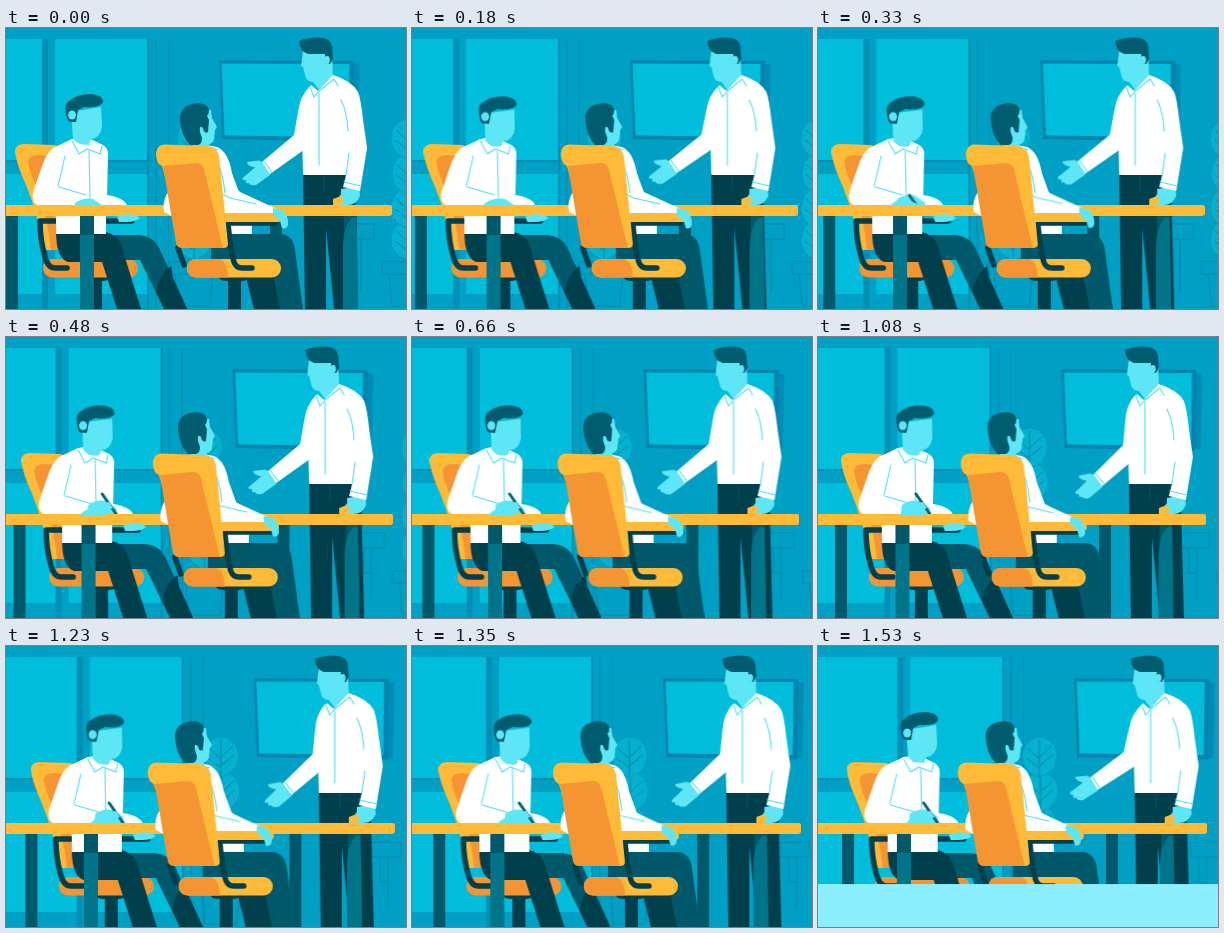
These frames come from a looping animation (400x281 px, 1.56 s). An HTML page:

```html
<!DOCTYPE html>
<html lang="en">
<head>
<meta charset="utf-8">
<title>Meeting</title>
<style>
html, body { margin: 0; height: 100%; overflow: hidden; background: #009fc4; }
svg { display: block; width: 100vw; height: 100vh; }

/* parallax: every layer drifts by its own --d over one loop */
.pan, .move { animation: pan 1560ms linear infinite; }
@keyframes pan { to { transform: translateX(var(--d)); } }
.far { --d: 44px; }
.plants { --d: 34px; }
.back { --d: 24.5px; }
.people { --d: 20px; }
.front { --d: 5px; }
.top { --d: 3.2px; }
.mid { --d: -10.5px; }
.head2 { --d: 4px; }

.nod { animation-name: nod; transform-origin: 76px 112px; }
@keyframes nod {
  0% { transform: none; }
  11.5%, 86.5% { transform: translate(4px, 2px) rotate(2deg); }
  98.1%, 100% { transform: translate(3.5px, 0); }
}
.write { animation-name: write; }
@keyframes write {
  0% { transform: translate(-7px, 7px); }
  11.5% { transform: translate(-3px, 7px); }
  30.8% { transform: none; }
  55.8% { transform: translate(-2px, 0); }
  69.2% { transform: translate(-6px, 0); }
  86.5% { transform: none; }
  98.1%, 100% { transform: translate(-4px, 0); }
}
.pen { animation-name: pen; }
@keyframes pen {
  0%, 14% { transform: translate(-4px, 20px); visibility: hidden; }
  25%, 100% { transform: none; visibility: visible; }
}
.wave { animation-name: wave; transform-origin: 303px 68px; }
@keyframes wave {
  0% { transform: none; }
  11.5% { transform: rotate(1.3deg); }
  30.8% { transform: none; }
  55.8% { transform: rotate(-.6deg); }
  69.2% { transform: rotate(-4.7deg); }
  86.5% { transform: rotate(-4deg); }
  98.1%, 100% { transform: rotate(3deg); }
}
.rest { animation-name: rest; }
@keyframes rest {
  0% { transform: none; }
  11.5% { transform: translateX(-1px); }
  30.8% { transform: translate(-6px, -1px); }
  55.8% { transform: translateX(-7px); }
  100% { transform: translate(-9px, -1px); }
}
.wipe { animation-name: wipe; }
@keyframes wipe {
  0%, 92.3% { transform: none; animation-timing-function: cubic-bezier(.33, 0, .67, .33); }
  100% { transform: translateY(-75px); }
}

.pane { fill: #00bedb; }
.frame { fill: #0090b5; }
.tv { fill: #0084ae; }
.yellow { fill: #ffbb38; }
.orange { fill: #f59432; }
.skin { fill: #5ce6f6; }
.hair { fill: #005c6f; }
.shirt { fill: #fff; }
.dark { fill: #003f4c; }
.teal { fill: #00586b; }
.glass { fill: #007488; }
.seam { fill: none; stroke: #4ee0f2; stroke-width: 1.1; stroke-linecap: round; stroke-linejoin: round; }
.thin { fill: none; stroke: #0089ae; stroke-width: 1; }
.bar { fill: none; stroke: #003f4c; stroke-width: 5.5; stroke-linecap: round; stroke-linejoin: round; }
.leaf { fill: #06b0cf; stroke: #0096bb; stroke-width: .8; }
</style>
</head>
<body>
<svg viewBox="0 0 400 281" preserveAspectRatio="none">
  <defs>
    <g id="lobe">
      <path class="leaf" d="M0 40C-13 37-18 27-17 18C-16 7-9 0 0 0C10 0 17 8 18 18C18 28 12 37 0 40Z"/>
      <path class="thin" d="M0 3V40M0 20L12 9M0 29L13 18M0 22L-12 11M0 31L-13 21"/>
    </g>
    <g id="plant">
      <use href="#lobe" y="192"/><use href="#lobe" y="160"/>
      <use href="#lobe" x="1" y="126"/><use href="#lobe" y="91"/>
      <path class="thin" d="M-26 234H26V246H-26ZM-19 246L-16 278H16L19 246"/>
    </g>
    <path id="post" class="dark" d="M-15 249H14Q14 253 7 253V282H-6V253Q-15 253-15 249Z"/>
  </defs>

  <rect width="400" height="281" fill="#009fc4"/>

  <g class="pan far">
    <path class="pane" d="M-60 11H36V132H-60ZM49 11H141V132H49ZM-60 146H36V266H-60ZM49 146H141V266H49Z"/>
    <path class="frame" d="M-60 132H147V134H-60ZM36 11H42V281H36ZM141 11H143V281H141ZM149 11H150.5V281H149ZM162 11H163V281H162Z"/>
    <path class="tv" d="M343 35L353.500 37L352 112L343 113Z" opacity=".7"/>
    <path class="tv" d="M213 32.500L348 33L347 113.500L216 111Z"/>
    <path class="pane" d="M215.5 35.500L343.500 36L342.500 109L218.500 107.500Z"/>
  </g>

  <g class="pan plants">
    <use href="#plant" x="188"/>
    <use href="#plant" x="402"/>
    <path class="thin" d="M339 196H368V211H339ZM344 196V190M355 211V264M347 211V236H355"/>
  </g>

  <g class="pan back teal">
    <path d="M0 186H12V281H0ZM264 186H276V281H264Z"/>
  </g>

  <!-- left chair and its sitter -->
  <g class="pan people">
    <path class="yellow" d="M9 124Q9 116 18 116L48 117Q55 118 57 126L62 222H38Q33 190 20 157Q11 138 9 124Z"/>
    <path class="orange" d="M22 133Q24 127 32 127L44 128L52 222H45Q42 190 30 158Q23 144 22 133Z"/>
    <use href="#post" x="89"/>
    <rect class="orange" x="37" y="231" width="95" height="18.500" rx="9"/>
    <path class="teal" d="M90 207H133Q147 208 153 220L181 281H158L134 232H100Z"/>
    <path class="dark" d="M158 281L150 264Q154 245 165 238L167 250L181 281Z"/>
    <path class="dark" d="M50 204H99Q111 206 115 217L135 281H111L96 234H62Q50 230 50 204Z"/>
    <path class="bar" d="M126 193H34Q34 212 39 229Q42 240 49 240H61"/>

    <path class="shirt" d="M66 111L47 120Q40 125 35 141L27 164Q25 177 35 178L50 178V206H100V178H121Q119 170 101 167L102 126Q102 119 95 116L80 109Z"/>
    <g class="move nod">
      <path class="skin" d="M65 84L95 79L96 98Q95 110 85 111L83 117L72 116L67 111Z"/>
      <path class="hair" d="M61 90Q57 76 63 73Q71 66 84 66Q97 67 97 74Q95 80 78 79L72 82L70 94H65Q62 94 61 90Z"/>
      <ellipse class="skin" cx="66" cy="87" rx="4" ry="4.500"/>
    </g>
    <path class="shirt" d="M66 111L80 120L95 116L97 126L82 121L72 126L63 113Z"/>
    <path class="seam" d="M66 113L73 126L81 121L94 126L96 118M83 123L84 170M59 128L52 158M53 159L80 167"/>
    <g class="move write">
      <path class="skin" d="M75 178L76 168Q84 162 94 164L104 171L105 178Z"/>
      <g class="move pen">
        <path d="M90 157L104 177" fill="none" stroke="#00667c" stroke-width="3" stroke-linecap="round"/>
        <path class="skin" d="M88 166L97 165L101 171L94 174Z"/>
      </g>
    </g>
  </g>

  <!-- presenter -->
  <g class="pan people">
    <path class="dark" d="M297 145H339Q347 150 349 165L352 281H328L320 200L320 281H299Z"/>
    <path class="seam" d="M318 148V163" style="stroke:#00586b"/>
    <path class="skin" d="M335 161L353 158L354 168Q350 177 342 177H332Q331 170 335 166Z"/>
    <path class="yellow" d="M327 171L335 168L338 173L334 177H327Z"/>
    <g class="move wave">
      <path class="skin" d="M264 138L253 132.500L241 134Q241 137.500 249 139.500L236.500 150Q236 153 240 152Q239 156 243 155Q244 158 250 157L264 147Z"/>
      <path class="shirt" d="M304 58Q294 68 292 84L288 107L256 134L264 146L302 119L312 72Z"/>
      <path class="seam" d="M258 133L266 144"/>
    </g>
    <path class="skin" d="M297 22L326 22L327 50L313 62L307 54Q300 54 299 47L297 39L295 38Z"/>
    <path class="shirt" d="M305 57L312 63L327 47Q346 53 352 64Q355 72 357 92L361 120L354 163L337 159L340 147H297L296 108Q294 76 305 57Z"/>
    <path class="hair" d="M293 13Q302 9 313 9.500Q325 10 326 18L327 31L324 36L319 35V26H302Q294 24 293 13Z"/>
    <ellipse class="skin" cx="321" cy="32" rx="2.800" ry="4"/>
    <path class="seam" d="M304 59L308 69L313 63L328 51L332 58M313 65V137M335 72Q341 84 342 103M340 147L343 125M338 154L355 158"/>
  </g>

  <g class="pan front">
    <path class="teal" d="M74 186H88V281H74ZM338 186H351V210H338Z"/>
    <path class="glass" d="M74 207H88V281H74Z"/>
    <path class="glass" d="M337 281V216Q338 198 346 190H350Q352 230 352 281Z"/>
  </g>
  <g class="pan top">
    <path class="yellow" d="M-10 177H384Q386 177 386 179V185Q386 188 383 188H-10Z"/>
  </g>
  <g class="pan people">
    <path class="skin" d="M111 189Q118 185 130 187L134 190Q130 194 120 194H113Z"/>
    <path class="skin" d="M68 178Q73 171 84 171L93 175L94 178Z"/>
  </g>

  <!-- chair in the foreground and its sitter -->
  <g class="pan mid">
    <path class="teal" d="M205 206H275Q287 207 289 222L297 281H268L258 234H205Z"/>
    <path class="dark" d="M240 249L248 281H274L266 241Z"/>
    <use href="#post" x="228"/>
    <path class="bar" d="M172 220L178 237"/>
    <rect class="yellow" x="181" y="231" width="94" height="18.500" rx="9"/>
    <path class="orange" d="M190 231H214Q222 235 222 249.500H190Q181 249 181 240Q181 231 190 231Z"/>
    <path class="shirt" d="M163 163Q156 172 158 184L166 188ZM200 117L211 119Q222 123 226 145L234 167L246 174V206H215Z"/>
    <g class="pan head2">
      <path class="skin" d="M190 82H205L206 90L211 99L209 102L208 112Q206 116 203 116L204 122H186Z"/>
      <path class="hair" d="M174 91Q174 79 186 76Q201 73 203 82Q203 86 201 88L203 92L202 104Q198 106 197 100Q193 96 194 104L196 110Q196 116 192 117H184Q175 108 174 91Z"/>
    </g>
    <g class="move rest">
      <path class="shirt" d="M224 152L234 164L271 181L269 187H212V165Z"/>
      <path class="seam" d="M216 166L224 170L250 176M270 181L268 186"/>
    </g>
    <path class="bar" d="M269 195H222Q224 220 228 234Q230 240 236 240H246"/>
    <rect class="yellow" x="212" y="185" width="64" height="9" rx="4"/>
    <path class="skin move rest" d="M267 180L276 182Q283 187 282 197Q280 202 276 200L274 193L267 187Z"/>
    <path class="seam" d="M210 130Q217 145 219 165M203 119L212 122"/>
    <path class="yellow" d="M150 125Q151 117 158 116.500L202 118Q211 119 213 128L222 216Q222 220 217 220H180L156 138Q150 136 150 125Z"/>
    <path class="orange" d="M157 138L190 135Q196 135 198 141L217 220H176Q171 220 170 215Z"/>
  </g>

  <rect class="move wipe" y="281" width="400" height="90" fill="#8befff"/>
</svg>
</body>
</html>
```
